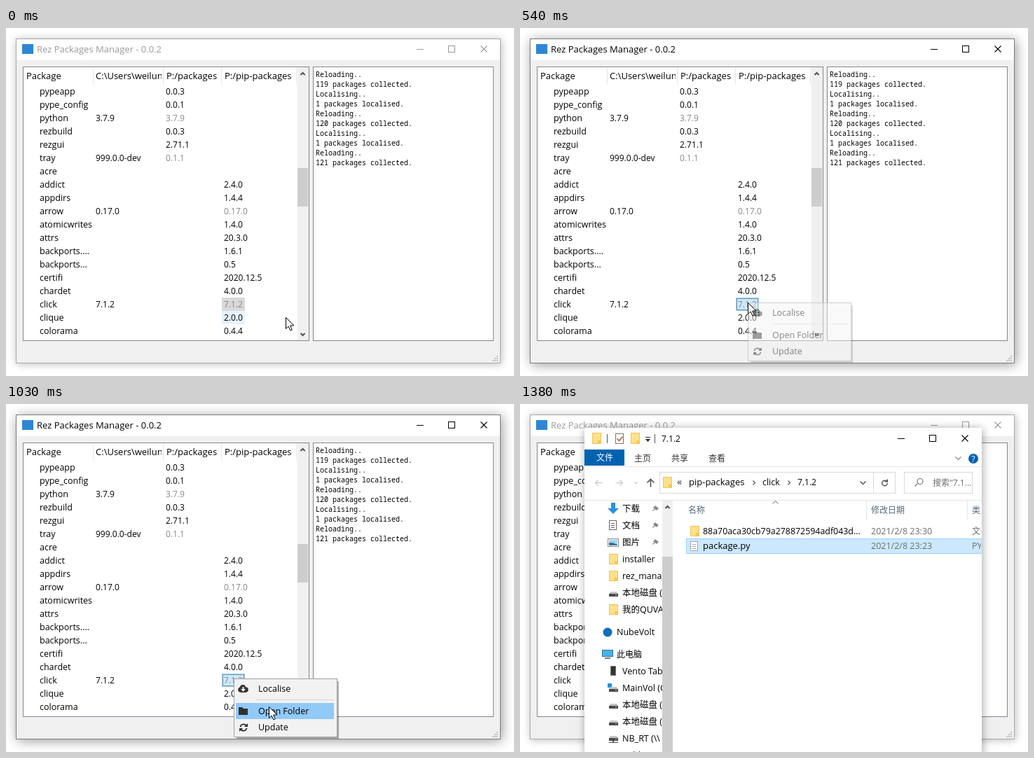
Write an HTML page with a canvas that moves like this. It is 725x497 px and loops after 1970 ms.

```html
<!DOCTYPE html>
<html lang="en">
<head>
<meta charset="utf-8">
<title>Package manager</title>
<style>
html, body { margin: 0; width: 100%; height: 100%; overflow: hidden; background: #fff; }
canvas { display: block; }
</style>
</head>
<body>
<canvas id="stage" width="725" height="497"></canvas>
<script>
const ctx = document.getElementById('stage').getContext('2d');
const LOOP = 1970;
const TICKS = [0, 50, 100, 150, 200, 250, 300, 350, 440, 490, 540, 590, 640, 690, 740,
  790, 840, 890, 940, 990, 1080, 1130, 1180, 1230, 1280, 1330, 1380];
// time, x, y of the pointer
const PATH = [[0, 399, 413], [300, 325, 392], [540, 325, 392], [840, 372, 428],
  [1080, 376, 434], [1130, 376, 434], [1330, 342, 488]];

// name, then the version in each of the three locations
const ROWS = `pypeapp||0.0.3
pype_config||0.0.1
python|3.7.9|~3.7.9
rezbuild||0.0.3
rezgui||2.71.1
tray|999.0.0-dev|~0.1.1
acre
addict|||2.4.0
appdirs|||1.4.4
arrow|0.17.0||~0.17.0
atomicwrites|||1.4.0
attrs|||20.3.0
backports....|||1.6.1
backports...|||0.5
certifi|||2020.12.5
chardet|||4.0.0
click|7.1.2||~7.1.2
clique|||2.0.0
colorama|||0.4.4`.split('\n').map(row => row.split('|'));
const COLUMNS = [48, 128, 228, 311];
const SELECTED = 16;

const LOG = ['Reloading..', '119 packages collected.', 'Localising..', '1 packages localised.',
  'Reloading..', '120 packages collected.', 'Localising..', '1 packages localised.',
  'Reloading..', '121 packages collected.'];

const UI = '"Open Sans", "Noto Sans CJK SC", "Noto Sans CJK", sans-serif';
const MONO = '"Noto Sans Mono", monospace';

function text(s, x, y, color = '#000', size = 12.5, family = UI) {
  ctx.font = `${size}px ${family}`;
  ctx.fillStyle = color;
  ctx.fillText(s, x, y);
}

function rect(x, y, w, h, fill, border) {
  if (fill) {
    ctx.fillStyle = fill;
    ctx.fillRect(x, y, w, h);
  }
  if (border) {
    ctx.strokeStyle = border;
    ctx.lineWidth = 1;
    ctx.strokeRect(x + .5, y + .5, w - 1, h - 1);
  }
}

function line(color, width, ...points) {
  ctx.beginPath();
  for (let i = 0; i < points.length; i += 2) ctx.lineTo(points[i] + .5, points[i + 1] + .5);
  ctx.strokeStyle = color;
  ctx.lineWidth = width;
  ctx.stroke();
}

function shape(fill, ...points) {
  ctx.beginPath();
  for (let i = 0; i < points.length; i += 2) ctx.lineTo(points[i], points[i + 1]);
  ctx.closePath();
  ctx.fillStyle = fill;
  ctx.fill();
}

function disc(x, y, r, fill) {
  ctx.beginPath();
  ctx.arc(x, y, r, 0, 7);
  ctx.fillStyle = fill;
  ctx.fill();
}

function arc(x, y, r, from, to, color, width) {
  ctx.beginPath();
  ctx.arc(x, y, r, from, to);
  ctx.strokeStyle = color;
  ctx.lineWidth = width;
  ctx.stroke();
}

function clipped(x, y, w, h, draw) {
  ctx.save();
  ctx.beginPath();
  ctx.rect(x, y, w, h);
  ctx.clip();
  draw();
  ctx.restore();
}

function shadowRect(x, y, w, h, fill, blur, alpha, offset) {
  ctx.save();
  ctx.shadowColor = `rgba(0,0,0,${alpha})`;
  ctx.shadowBlur = blur;
  ctx.shadowOffsetX = ctx.shadowOffsetY = offset;
  rect(x, y, w, h, fill);
  ctx.restore();
}

// chevron pointing down (dir 1) or up (dir -1)
const chevron = (x, y, dir, color, width = 1.5, r = 3) =>
  line(color, width, x - r, y - dir * r / 2, x, y + dir * r / 2, x + r, y - dir * r / 2);

const chevronRight = (x, y, color) => line(color, 1.2, x - 1, y - 3, x + 2, y, x - 1, y + 3);

function windowButtons(minX, y, color) {
  rect(minX, y, 10, 1, color);
  rect(minX + 45, y - 5, 10, 10, null, color);
  line(color, 1.1, minX + 91, y - 5, minX + 100, y + 4);
  line(color, 1.1, minX + 100, y - 5, minX + 91, y + 4);
}

function pointerAt(t) {
  const next = PATH.findIndex(key => key[0] > t);
  if (next < 0) return PATH[PATH.length - 1].slice(1);
  const [t0, x0, y0] = PATH[next - 1], [t1, x1, y1] = PATH[next];
  const k = (t - t0) / (t1 - t0);
  const e = k * k * (3 - 2 * k);
  return [x0 + (x1 - x0) * e, y0 + (y1 - y0) * e].map(Math.round);
}

function drawPointer([x, y]) {
  ctx.save();
  ctx.translate(x + .5, y + .5);
  shape('#fff', 0, 0, 0, 16, 3.7, 12.6, 6.4, 18.5, 8.8, 17.4, 6.2, 11.6, 11.4, 11.4);
  ctx.strokeStyle = '#000';
  ctx.lineWidth = 1;
  ctx.stroke();
  ctx.restore();
}

function drawCells(active, hoverRow) {
  const cell = (row, fill, border) => rect(308, 81 + row * 19, 33, 19, fill, border);
  if (hoverRow > SELECTED) cell(hoverRow, '#e5f3ff');
  if (active) {
    cell(SELECTED, '#cce8ff', '#99d1ff');
    ctx.setLineDash([1, 1]);
    rect(309, 82 + SELECTED * 19, 31, 17, null, '#333');
    ctx.setLineDash([]);
  } else if (hoverRow === SELECTED) cell(SELECTED, '#cce8ff', '#99d1ff');
  else cell(SELECTED, '#d9d9d9');
}

function drawManager(active, hoverRow) {
  shadowRect(14, 15, 692, 464, '#f0f0f0', active ? 16 : 11, active ? .4 : .28, active ? 2 : 1);
  rect(14, 15, 692, 464, '#f0f0f0', active ? '#7c7c7c' : '#aaa');
  rect(15, 16, 690, 30, '#fff');
  rect(23, 23, 16, 14, '#2f86d6');
  text('Rez Packages Manager - 0.0.2', 44, 35, active ? '#000' : '#999', 13);
  windowButtons(586, 30, active ? '#000' : '#999');

  rect(24, 55, 409, 392, '#fff', '#828790');
  for (const x of [124, 224, 307, 414]) rect(x, 56, 1, 25, '#e5e5e5');
  text('Package', 29, 73, '#000', 13);
  clipped(125, 56, 97, 25, () => text('C:\\Users\\weilunk', 128, 73, '#000', 13));
  text('P:/packages', 229, 73, '#000', 13);
  text('P:/pip-packages', 312, 73, '#000', 13);

  drawCells(active, hoverRow);
  ROWS.forEach((row, i) => row.forEach((value, c) => {
    const dim = value[0] === '~';
    text(dim ? value.slice(1) : value, COLUMNS[c], 95 + i * 19, dim ? '#888' : '#000', c ? 12 : 12.5);
  }));

  rect(416, 56, 16, 390, '#f0f0f0');
  rect(416, 200, 15, 55, '#cdcdcd');
  chevron(423, 65, -1, '#505050', 2);
  chevron(423, 437, 1, '#505050', 2);

  rect(438, 55, 258, 392, '#fff', '#828790');
  LOG.forEach((s, i) => text(s, 442, 70 + i * 14, '#000', 10, MONO));

  for (let i = 0; i < 3; i++)
    for (let j = 2 - i; j < 3; j++) rect(694 + j * 3, 468 + i * 3, 2, 2, '#bfbfbf');
}

function drawMenu(alpha, [, y]) {
  ctx.save();
  ctx.globalAlpha = alpha;
  rect(473, 396, 2, 82, 'rgba(0,0,0,.3)');
  rect(329, 476, 144, 2, 'rgba(0,0,0,.3)');
  rect(325, 392, 148, 84, '#f2f2f2', '#a0a0a0');
  if (y >= 396 && y < 419) rect(328, 396, 140, 23, '#91c9f7');
  if (y >= 427 && y < 450) rect(328, 427, 140, 23, '#91c9f7');
  rect(357, 422, 111, 1, '#d7d7d7');
  const ink = '#303030';
  text('Localise', 360, 411);
  text('Open Folder', 360, 443);
  text('Update', 360, 466);
  disc(335, 408, 3.8, ink);
  disc(338, 405, 4, ink);
  disc(342, 408, 3.8, ink);
  rect(335, 406, 7, 6, ink);
  rect(337.5, 404, 2, 4, '#f2f2f2');
  shape('#f2f2f2', 335, 407, 342, 407, 338.5, 411);
  shape(ink, 332, 433, 337, 433, 339, 435, 345, 435, 345, 444, 332, 444);
  arc(339, 462, 4.6, 3.3, 5.8, ink, 2);
  arc(339, 462, 4.6, .2, 2.7, ink, 2);
  shape(ink, 345, 456, 345, 461, 340, 461);
  shape(ink, 333, 468, 333, 463, 338, 463);
  ctx.restore();
}

function folder(x, y, h = 16) {
  rect(x, y, 13, h, '#ffe08a', '#ecc558');
  rect(x + 8, y + h - 5, 5, 5, '#f3c94f');
}

function page(x, y, color) {
  rect(x, y, 11, 14, '#fff', color);
  for (let i = 4; i < 12; i += 3) rect(x + 3, y + i, 5, 1, color);
}

function disk(x, y) {
  shape('#c4c4c4', x + 2, y - 1, x + 11, y - 1, x + 13, y + 2, x, y + 2);
  rect(x, y + 2, 13, 4, '#4a4a4a');
  rect(x + 9, y + 3, 2, 1, '#7fe07f');
}

function monitor(x, y, w, h) {
  rect(x, y, w, h, '#45b4ee', '#356b91');
  rect(x + w / 2 - 4, y + h + 1, 8, 2, '#6b7f8d');
}

const NAV_ICONS = {
  down: y => shape('#2f8fdd', 130, y - 8, 136, y - 8, 136, y, 141, y, 133, y + 8, 125, y, 130, y),
  page: y => page(127, y - 7, '#666'),
  picture: y => {
    rect(125, y - 5, 16, 12, '#fff', '#8a8a8a');
    rect(127, y - 3, 12, 8, '#9fd4f5');
    shape('#3f6f8f', 127, y + 5, 127, y + 1, 132, y + 1, 139, y + 4, 139, y + 5);
  },
  folder: y => folder(127, y - 7, 15),
  disk: y => disk(127, y),
  device: y => rect(129, y - 7, 8, 14, '#333', '#777'),
  system: y => { rect(125, y - 6, 6, 6, '#1e90e0'); disk(127, y); },
  share: y => { disk(127, y - 2); rect(132, y + 4, 2, 3, '#555'); rect(127, y + 6, 13, 1, '#555'); }
};
const NAV = [['down', '下载', 149], ['page', '文档', 173], ['picture', '图片', 197],
  ['folder', 'installer', 221], ['folder', 'rez_manager', 245], ['disk', '本地磁盘 (D:)', 269],
  ['folder', '我的QUVA', 293], ['device', 'Vento Tab', 381], ['system', 'MainVol (C:)', 405],
  ['disk', '本地磁盘 (D:)', 429], ['disk', '本地磁盘 (E:)', 453], ['share', 'NB_RT (\\\\', 477],
  ['share', 'public (\\\\', 501]];

function drawNavigation() {
  clipped(93, 138, 110, 359, () => {
    for (const [icon, label, y] of NAV) {
      NAV_ICONS[icon](y);
      text(label, 146, y + 5);
    }
    disc(125, 326, 6.5, '#0f6cbd');
    text('NubeVolt', 138, 330);
    monitor(117, 351, 16, 10);
    text('此电脑', 138, 362, '#000', 12);
  });
  for (const y of [149, 173, 197]) {
    shape('#858b91', 193, y - 4, 198, y, 195, y + 3, 190, y - 1);
    line('#858b91', 1.3, 192, y, 189, y + 3);
  }
  rect(203, 138, 15, 359, '#f0f0f0');
  rect(203, 218, 15, 279, '#cdcdcd');
  chevron(210, 147, -1, '#505050', 2);
}

function drawFiles() {
  const dim = '#6d6d6d';
  for (const x of [494, 638]) rect(x, 138, 1, 27, '#e5e5e5');
  chevron(364, 140, -1, '#666', 1, 4);
  text('名称', 240, 156, '#53687e', 12);
  text('修改日期', 501, 156, '#53687e', 12);
  rect(237, 192, 422, 22, '#cce8ff');
  rect(237, 192, 422, 1, '#99d1ff');
  rect(237, 213, 422, 1, '#99d1ff');
  rect(237, 192, 1, 22, '#99d1ff');
  folder(243, 174, 15);
  page(243, 196, '#a5a5a5');
  text('88a70aca30cb79a278872594adf043d...', 261, 186, '#000', 12.4);
  text('package.py', 261, 207, '#000', 13);
  text('2021/2/8 23:30', 501, 186, dim);
  text('2021/2/8 23:23', 501, 207, dim);
  clipped(639, 138, 19, 80, () => {
    text('类型', 645, 156, '#53687e', 12);
    text('文件夹', 645, 186, dim, 12);
    text('PY', 645, 207, dim);
  });
}

function drawExplorer() {
  shadowRect(92, 34, 567, 480, '#fff', 12, .35, 1);

  folder(103, 41);
  rect(124, 43, 1, 13, '#555');
  rect(136, 42, 12, 15, '#fff', '#777');
  line('#d2552d', 1.6, 138, 49, 141, 52, 146, 46);
  folder(158, 41);
  rect(179, 47, 7, 1, '#222');
  shape('#222', 179, 50, 186, 50, 182.5, 54);
  rect(192, 43, 1, 13, '#555');
  text('7.1.2', 202, 54, '#000', 12);
  windowButtons(539, 49, '#000');

  rect(92, 65, 57, 23, '#0063b1');
  text('文件', 109, 81, '#fff', 12);
  [['主页', 163], ['共享', 216], ['查看', 269]].forEach(([s, x]) => text(s, x, 82, '#333', 12));
  chevron(625, 77, 1, '#888', 1.2, 4);
  disc(647, 78, 7, '#0063b1');
  text('?', 644.2, 82.5, '#fff', 12);
  for (const y of [89, 137]) rect(92, y, 567, 1, '#e4e4e4');

  const arrow = (x, dir) => {
    line('#c9c9c9', 1.3, x - 5, 112, x + 5, 112);
    line('#c9c9c9', 1.3, x + dir, 108, x + dir * 5, 112, x + dir, 116);
  };
  arrow(112, -1);
  arrow(141, 1);
  chevron(165, 112, 1, '#c9c9c9', 1.2, 2);
  line('#555', 1.6, 186, 118, 186, 107);
  line('#555', 1.6, 181, 112, 186, 107, 191, 112);

  rect(199, 97, 306, 31, '#fff', '#d9d9d9');
  rect(504, 97, 32, 31, '#fff', '#d9d9d9');
  rect(548, 97, 98, 31, '#fff', '#d9d9d9');
  folder(204, 104);
  text('«', 224, 116, '#333', 14);
  text('pip-packages', 241, 116, '#000', 13);
  chevronRight(333, 112, '#555');
  text('click', 346, 116, '#000', 12.5);
  chevronRight(383, 112, '#555');
  text('7.1.2', 396, 116, '#000', 12);
  chevron(489, 112, 1, '#555', 1.5, 4);
  arc(520.5, 113, 3.8, 0, 5.2, '#555', 1.4);
  shape('#555', 525, 107, 525, 112, 520, 111);
  arc(571, 110.5, 4, 0, 7, '#777', 1.2);
  line('#777', 1.2, 567, 113, 563, 117);
  text('搜索"7.1...', 589, 117, '#6d6d6d', 12);

  drawNavigation();
  drawFiles();
}

function render(t) {
  const pointer = pointerAt(t);
  const active = t >= 440 && t < 1130;
  const hovering = !active && pointer[1] < 446;
  const hoverRow = hovering ? Math.floor((pointer[1] - 81) / 19) : -1;
  rect(0, 0, 725, 497, '#fff');
  drawManager(active, hoverRow);
  if (active && t > 490) drawMenu(Math.min(1, (t - 490) / 110), pointer);
  if (t >= 1380) drawExplorer();
  else drawPointer(pointer);
}

function loop() {
  const now = performance.now() % LOOP;
  render(TICKS.filter(tick => tick <= now).pop());
  requestAnimationFrame(loop);
}
loop();
</script>
</body>
</html>
```
